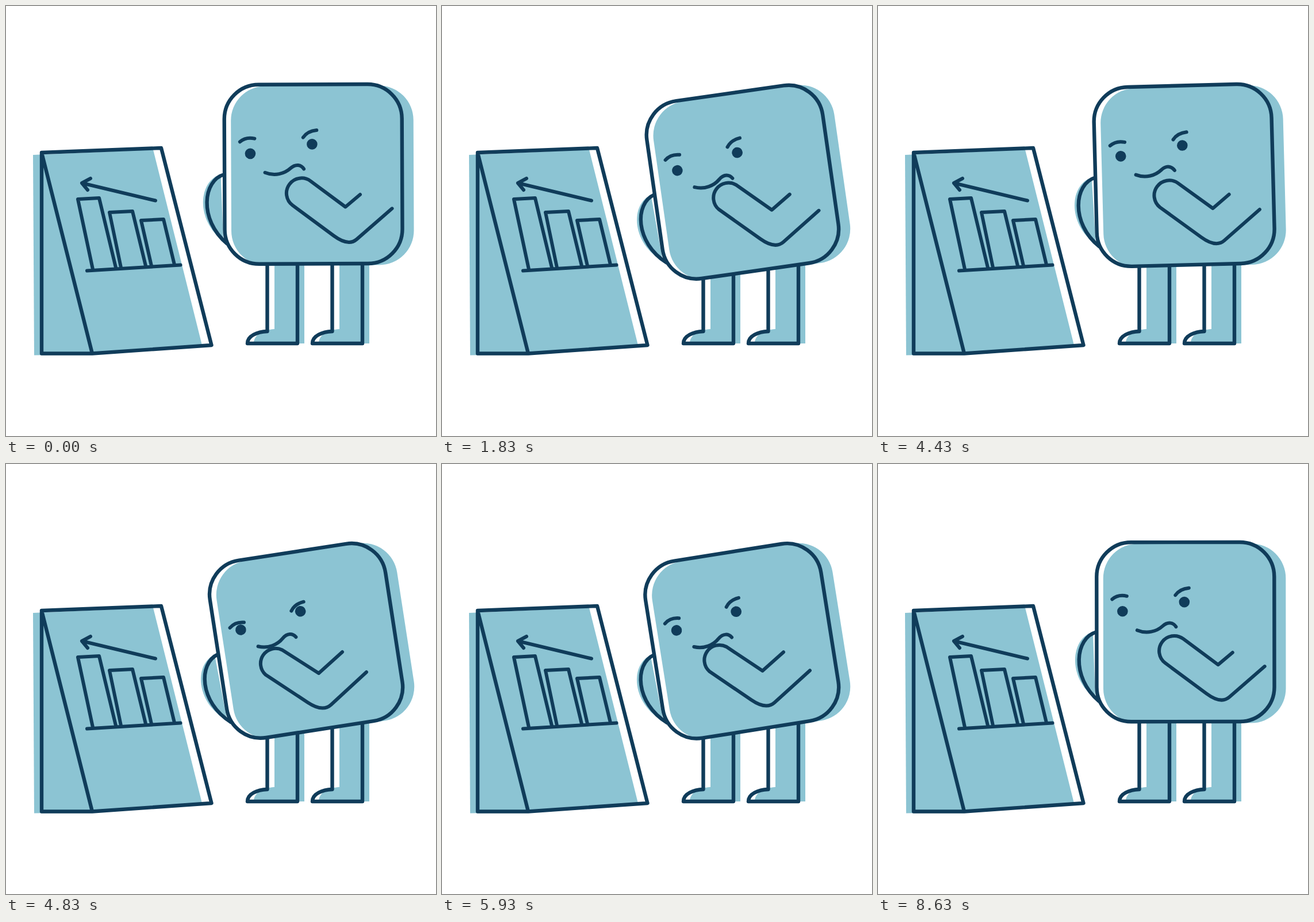
Animation, 748 px wide and 748 px high, one loop 8.66 s. Source, as an HTML page:

```html
<!DOCTYPE html>
<html>
<head>
<meta charset="utf-8">
<style>
  html, body { margin: 0; width: 100%; height: 100%; overflow: hidden; background: #fff; }
  svg { display: block; width: 100%; height: 100%; }
  .tint { fill: #8cc4d3; }
  .line { fill: none; stroke: #103c5a; stroke-width: 6.4; stroke-linecap: round; stroke-linejoin: round; }
  .thin { stroke-width: 6; }
</style>
</head>
<body>
<svg viewBox="0 0 748 748">
  <defs>
    <g id="leg">
      <path class="tint" d="M467 430V562C449 563 431 571 431 587H519V430Z"/>
      <path class="line" d="M454.5 430V566C437 566.500 420 574 420 587H507V430"/>
    </g>
  </defs>

  <path class="tint" d="M47 259L256 250L341 590L150 606L49 607.500Z"/>
  <path class="line" d="M62 255L270 247L357.500 590L150 604.500H62ZL150 604.500"/>
  <path class="line thin" d="M260 338.500L132 308M147 300L132 308L142 320
    M151 458L125 336L162 334L191 455M200 455L180 359L220 357L243 452
    M253 452L235 373L274 371L293 450M141 460.500L303.500 450.500"/>

  <g class="lean">
    <path class="tint" d="M374 292C336 302 328 370 378 408Z"/>
    <path class="line" d="M380 292C343 302 335 370 384 412"/>
  </g>
  <use href="#leg"/>
  <use href="#leg" x="113"/>
  <g class="lean">
    <rect x="380.500" y="136" width="309" height="312" rx="60" fill="#fff"/>
    <rect class="tint" x="392" y="138.500" width="317.500" height="312" rx="60"/>
    <rect class="line" x="380.500" y="136" width="309" height="312" rx="60"/>
    <circle cx="425.500" cy="256" r="9.300" fill="#103c5a"/>
    <circle cx="533" cy="240" r="9.300" fill="#103c5a"/>
    <path id="browL" class="line thin" d="M407.500 235Q418 226 433 229.500"/>
    <path id="browR" class="line thin" d="M517.500 228Q525 217 541 215.500"/>
    <path class="line thin" d="M451 289C468 296 485 291 495 282C505 273 514 276 518.500 283"/>
  </g>
  <path id="arm" class="line thin"/>
</svg>
<script>
const LOOP = 4330, LEAD = 60, PIVOT = '629 384';
const get = id => document.getElementById(id);
const parts = document.querySelectorAll('.lean');

// upper tip, crook, top of fist, bottom of fist, elbow, lower tip
const REST = [617, 328, 592, 349, 531.5, 304, 500, 346, 597, 418, 673, 352];
const NEAR = [585, 327, 544, 364, 480.5, 323.5, 451.5, 366.5, 551, 432, 627, 362];
const CHIN = [600, 323, 557, 362, 494, 324, 466, 368, 565, 430, 642, 357];

function ease(u, from, to) {
  const x = Math.min(1, Math.max(0, (u - from) / (to - from)));
  return x * x * (3 - 2 * x);
}
const pulse = (u, a, b, c, d) => ease(u, a, b) - ease(u, c, d);
const mix = (a, b, k) => a.map((v, i) => v + (b[i] - v) * k);

function armPath(p) {
  const at = i => [p[2 * i], p[2 * i + 1]];
  const [tip, crook, top, low, elbow, end] = [0, 1, 2, 3, 4, 5].map(at);
  return `M${tip}L${crook}L${top}A26.200 26.200 0 0 0 ${low}` +
    `L${mix(elbow, low, .26)}Q${elbow} ${mix(elbow, end, .19)}L${end}`;
}

function draw(now) {
  const u = (now + LEAD) % LOOP;
  const angle = -9 * pulse(u, 0, 620, 1760, 2440);
  parts.forEach(g => g.setAttribute('transform', `rotate(${angle} ${PIVOT})`));

  const left = 15.5 * pulse(u, 0, 660, 1490, 1790);
  const right = 9.5 * pulse(u, 0, 660, 1420, 1740);
  get('browL').setAttribute('transform', `translate(0 ${left})`);
  get('browR').setAttribute('transform', `translate(0 ${right})`);

  const rub = mix(NEAR, CHIN, pulse(u, 560, 960, 960, 1310));
  get('arm').setAttribute('d', armPath(mix(REST, rub, pulse(u, 0, 560, 1310, 2310))));
}

let start;
function tick(now) {
  start ??= now;
  draw(now - start);
  requestAnimationFrame(tick);
}
draw(0);
requestAnimationFrame(tick);
</script>
</body>
</html>
```
